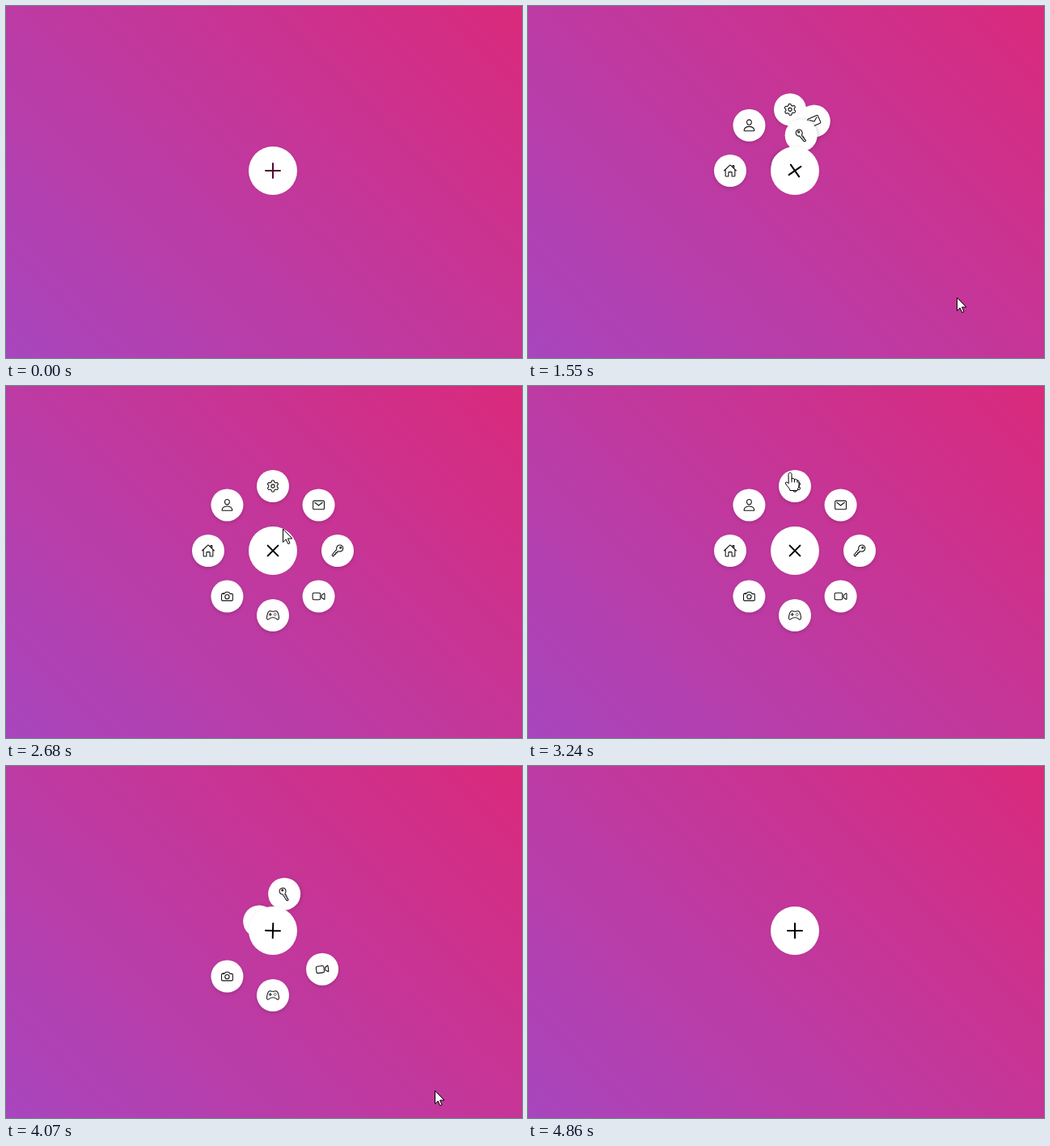
These frames come from a looping animation (638 by 436 pixels, 5.6 s). An HTML page with a canvas:

```html
<!DOCTYPE html>
<html lang="en">
<head>
<meta charset="utf-8">
<title>Circular menu</title>
<style>
  html, body { margin: 0; width: 100%; height: 100%; overflow: hidden; }
  canvas { display: block; }
</style>
</head>
<body>
<canvas id="stage" width="638" height="436"></canvas>
<script>
const ctx = document.getElementById('stage').getContext('2d');
const LOOP = 5600, W = 638, H = 436;
const CX = 330, CY = 204, ORBIT = 80;
const OPEN = 990, CLOSE = 3547;
const ICON = 17 / 512;

const MARKS = [130, 700, 1270, 1840, 2450, 3060, 3650, 4260, 4860];

// Pointer keys: time, x, y
const TRACK = [
  [130, 401, 414], [400, 372, 310], [650, 345, 220], [960, 346, 217],
  [1080, 357, 248], [1220, 438, 325], [1500, 520, 361], [1790, 569, 358],
  [1970, 597, 295], [2200, 575, 240], [2400, 507, 203], [2680, 342, 177],
  [2850, 320, 146], [3060, 318, 143], [3250, 324, 107], [3450, 336, 175],
  [3546, 352, 212], [3600, 388, 262], [3700, 397, 286], [3900, 470, 365],
  [4070, 530, 402], [4250, 530, 403], [4860, 513, 424]
];

const ring = (x, y, r) =>
  `M${x + r} ${y}a${r} ${r} 0 1 0 ${-2 * r} 0a${r} ${r} 0 1 0 ${2 * r} 0Z`;

function gear() {
  let d = '';
  for (let k = 0; k < 72; k++) {
    const a = k * Math.PI / 36;
    const r = 184 + 26 * Math.max(-1, Math.min(1, -2 * Math.cos(6 * a)));
    d += `${k ? 'L' : 'M'}${256 + r * Math.cos(a)} ${256 + r * Math.sin(a)}`;
  }
  return d + 'Z' + ring(256, 256, 64);
}

const home = 'M80 212v236a16 16 0 0 0 16 16h96V328a24 24 0 0 1 24-24h80a24 24 0 0 1 24 24v136h96' +
  'a16 16 0 0 0 16-16V212M480 256L267 52c-5-5-17-5-22 0L32 256M400 179V64h-48v69';
const person = 'M344 144c-4 53-44 96-88 96s-84-43-88-96c-4-55 35-96 88-96s92 42 88 96z' +
  'M256 304c-87 0-175 48-192 139C62 454 69 464 80 464h352c11 0 18-10 16-21C431 352 343 304 256 304z';
const mail = 'M88 96h336a40 40 0 0 1 40 40v240a40 40 0 0 1-40 40H88a40 40 0 0 1-40-40V136' +
  'a40 40 0 0 1 40-40zM112 160l144 112 144-112';
const key = 'M222 205L55 399C45 412 52 428 62 440C75 455 90 470 98 463L122 438' +
  'C132 428 122 410 126 402C134 386 155 400 168 394C180 388 190 380 188 368' +
  'C186 356 176 348 184 338C196 328 206 346 220 342C232 338 244 326 242 318' +
  'C240 306 230 296 234 290C242 276 260 288 276 284L292 277A122 120 0 1 0 222 205Z' +
  ring(368, 144, 30);
const video = 'M375 309l82 58a16 16 0 0 0 23-15V160a16 16 0 0 0-23-15l-82 58a16 16 0 0 0-7 13v80' +
  'a16 16 0 0 0 7 13zM268 384H84a52 52 0 0 1-52-52V180a52 52 0 0 1 52-52h184a52 52 0 0 1 52 52v152' +
  'a52 52 0 0 1-52 52z';
const gamepad = 'M468 249c-18-83-46-136-90-149a92 92 0 0 0-26-4c-27 0-48 16-96 16s-69-16-96-16' +
  'a99 99 0 0 0-27 4C89 113 62 166 43 249c-19 85-15 152 22 165 26 9 49-10 71-37 25-31 56-41 120-41' +
  's94 10 119 41c22 27 46 46 71 37 41-14 41-79 22-165zM160 176v96M112 224h96' +
  ring(292, 224, 6) + ring(336, 180, 6) + ring(336, 268, 6) + ring(380, 224, 6);
const camera = 'M351 149l-27-42c-6-7-13-11-22-11h-92c-9 0-16 4-22 11l-27 42c-5 6-12 11-21 11H80' +
  'a32 32 0 0 0-32 32v192a32 32 0 0 0 32 32h352a32 32 0 0 0 32-32V192a32 32 0 0 0-32-32h-59' +
  'c-9 0-17-5-22-11zM124 158v-22h-24v22' + ring(256, 272, 80);

const icons = [home, person, gear(), mail, key, video, gamepad, camera].map(d => new Path2D(d));

const arrow = new Path2D('M.5.5V16.5L4.2 13L6.8 18.6L9 17.6L6.5 12H11.5Z');
const hand = new Path2D('M-2 2.2C-2-.2 2-.2 2 2.2V8C3 6.8 5 7.2 5.5 9C7 7.8 8.6 8.4 9 10.2' +
  'C10.4 9.4 11 10.4 11 12V16C11 19 9 20 9 22.5H0C0 20-3 18-5.5 14C-6.5 12-4 11-2 13.5Z');
const knuckles = new Path2D('M2 8V12M5.5 9V12M9 10.2V12.5');

// CSS "ease": cubic-bezier(.25, .1, .25, 1)
function ease(x) {
  if (x <= 0) return 0;
  if (x >= 1) return 1;
  let lo = 0, hi = 1, s = 0.5;
  for (let k = 0; k < 24; k++) {
    s = (lo + hi) / 2;
    const u = 1 - s;
    if (0.75 * s * u * u + 0.75 * s * s * u + s * s * s < x) lo = s;
    else hi = s;
  }
  const u = 1 - s;
  return 0.3 * s * u * u + 3 * s * s * u + s * s * s;
}

const progress = (t, delay, span) =>
  ease((t - OPEN - delay) / span) - ease((t - CLOSE - delay) / span);

function snap(t) {
  const i = MARKS.findLastIndex(m => m <= t);
  if (i < 0) return 0;
  if (i === MARKS.length - 1) return MARKS[i];
  const from = MARKS[i], span = MARKS[i + 1] - from;
  const step = span / Math.round(span / 47);
  return Math.min(t, from + Math.floor((t - from + 11) / step) * step);
}

function item(i, t) {
  const p = progress(t, i * 100, 500);
  const a = i * Math.PI / 4;
  return {
    x: CX - ORBIT * p * Math.cos(a * p),
    y: CY - ORBIT * p * Math.sin(a * p),
    turn: a * (p - 1)
  };
}

function pointer(t) {
  t = Math.max(t, TRACK[0][0]);
  const last = TRACK.length - 1;
  let i = 0;
  while (i < last - 1 && TRACK[i + 1][0] <= t) i++;
  const a = TRACK[i], b = TRACK[i + 1];
  const span = b[0] - a[0], u = Math.min(1, (t - a[0]) / span);
  const slope = (k, c) => {
    if (k === 0 || k === last) return 0;
    const [p, q, r] = [TRACK[k - 1], TRACK[k], TRACK[k + 1]];
    const m = (q[c] - p[c]) / (q[0] - p[0]), n = (r[c] - q[c]) / (r[0] - q[0]);
    return m * n > 0 ? 2 * m * n / (m + n) : 0;
  };
  const at = c => {
    const v = 1 - u;
    return a[c] * v * v * (1 + 2 * u) + b[c] * u * u * (3 - 2 * u) +
      span * u * v * (slope(i, c) * v - slope(i + 1, c) * u);
  };
  return { x: at(1), y: at(2) };
}

function disc(x, y, r, turn, drop, blur, alpha) {
  ctx.save();
  ctx.shadowColor = `rgba(0,0,0,${alpha})`;
  ctx.shadowBlur = blur;
  ctx.shadowOffsetX = -drop * Math.sin(turn);
  ctx.shadowOffsetY = drop * Math.cos(turn);
  ctx.fillStyle = '#fff';
  ctx.beginPath();
  ctx.arc(x, y, r, 0, 2 * Math.PI);
  ctx.fill();
  ctx.restore();
}

function drawItem(i, t) {
  const { x, y, turn } = item(i, t);
  if (Math.hypot(x - CX, y - CY) < 6) return;
  disc(x, y, 20, turn, 2, 4, 0.15);
  ctx.save();
  ctx.translate(x, y);
  ctx.rotate(turn);
  ctx.scale(ICON, ICON);
  ctx.translate(-256, -256);
  ctx.lineWidth = 32;
  ctx.strokeStyle = '#111';
  ctx.stroke(icons[i]);
  ctx.restore();
}

function drawToggle(t) {
  disc(CX, CY, 30, 0, 0, 3, 0.08);
  ctx.save();
  ctx.translate(CX, CY);
  ctx.rotate(progress(t, 0, 1250) * Math.PI * 1.75);
  ctx.lineWidth = 2;
  ctx.strokeStyle = t < OPEN ? '#4f0a30' : '#000';
  ctx.beginPath();
  ctx.moveTo(-9, 0);
  ctx.lineTo(9, 0);
  ctx.moveTo(0, -9);
  ctx.lineTo(0, 9);
  ctx.stroke();
  ctx.restore();
}

// The pointer shape reacts a little later than the pointer moves
function overButton(t) {
  const p = pointer(t);
  const near = (x, y, r) => Math.hypot(p.x - x, p.y - y) < r;
  return near(CX, CY, 29) || icons.some((_, i) => {
    const { x, y } = item(i, t);
    return near(x, y, 20);
  });
}

function drawPointer(t) {
  if (t < MARKS[0] || t >= MARKS.at(-1)) return;
  const { x, y } = pointer(t);
  const link = overButton(t - 50);
  const shape = link ? hand : arrow;
  ctx.save();
  ctx.translate(Math.round(x), Math.round(y));
  ctx.fillStyle = '#fff';
  ctx.strokeStyle = '#000';
  ctx.lineWidth = 1;
  ctx.fill(shape);
  ctx.stroke(shape);
  if (link) ctx.stroke(knuckles);
  ctx.restore();
}

const backdrop = ctx.createLinearGradient(50.5, 486.5, 587.5, -50.5);
backdrop.addColorStop(0, '#a846be');
backdrop.addColorStop(1, '#da2a7c');
ctx.lineCap = ctx.lineJoin = 'round';

function draw(t) {
  ctx.fillStyle = backdrop;
  ctx.fillRect(0, 0, W, H);
  icons.forEach((_, i) => drawItem(i, t));
  drawToggle(t);
  drawPointer(t);
}

const start = performance.now();
function tick() {
  draw(snap((performance.now() - start) % LOOP));
  requestAnimationFrame(tick);
}
tick();
</script>
</body>
</html>
```
